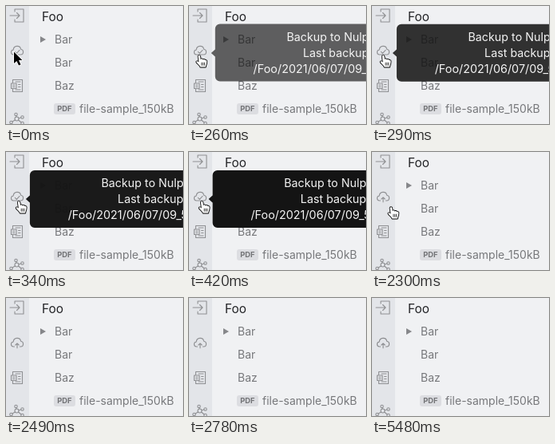
An HTML page with a canvas that plays this animation: 222x148 px, repeating every 8 s.

```html
<!DOCTYPE html>
<html lang="en">
<head>
<meta charset="utf-8">
<title>Backup tooltip</title>
<style>
html, body { margin: 0; width: 100%; height: 100%; overflow: hidden; background: #f0f1f3; }
canvas { display: block; width: 222px; height: 148px; }
</style>
</head>
<body>
<canvas id="stage"></canvas>
<script>
const W = 222, H = 148, LOOP = 8000;
const canvas = document.getElementById('stage');
const ctx = canvas.getContext('2d');
const ratio = window.devicePixelRatio || 1;
canvas.width = W * ratio;
canvas.height = H * ratio;

const FONT = 'Inter, "Liberation Sans", sans-serif';
const ICON = '#8f9093';

function text(str, x, y, size, color, weight = 400, align = 'left') {
  ctx.font = `${weight} ${size}px ${FONT}`;
  ctx.fillStyle = color;
  ctx.textAlign = align;
  ctx.fillText(str, x, y);
}

function box(x, y, w, h, r, color) {
  ctx.beginPath();
  ctx.roundRect(x, y, w, h, r);
  ctx.fillStyle = color;
  ctx.fill();
}

function line(d, color = ICON, width = 1.1) {
  ctx.strokeStyle = color;
  ctx.lineWidth = width;
  ctx.stroke(new Path2D(d));
}

function dot(x, y, r) {
  ctx.beginPath();
  ctx.arc(x, y, r, 0, Math.PI * 2);
  ctx.strokeStyle = ICON;
  ctx.lineWidth = 1.1;
  ctx.stroke();
}

function cloud(mark, color) {
  const outline = 'M10.5 61 H9.3 C5.5 60.6 5.5 55.4 9.2 55 C9.4 49.2 17.8 48.8 18.6 54.2 C22.6 54.6 22.6 60.7 18.6 61 ';
  if (mark === 'check') line(outline + 'Z M11.3 57.4 L13.3 59.4 L17 55.4', color);
  else line(outline + 'H17.3 M14 62.7 V56.8 M11.8 59 L14 56.8 L16.2 59', color);
}

function sidebar(t) {
  ctx.fillStyle = '#e3e5e9';
  ctx.fillRect(0, 0, 29, H);
  line('M11 7 V4 H22 V20 H11 V17 M5 12 H17 M13.5 8.5 L17 12 L13.5 15.5');
  cloud(t < 740 ? 'check' : 'up', t < 5480 ? ICON : '#898a8d');
  line('M8.5 96.5 V92.5 H20.5 V107.5 H8.5 V104 M6.5 97 H13 V103.5 H6.5 Z');
  line('M8.5 99.2 H11 M8.5 101.4 H11 M12 95 H18 M15.5 98.5 H18 M15.5 101.5 H18 M12 105 H18', ICON, 1);
  dot(13.5, 141.5, 2.5);
  dot(12.5, 136, 1.7);
  dot(20.5, 139.5, 1.7);
  dot(6.5, 146, 1.7);
  dot(20.5, 147, 1.7);
  line('M13 137.6 V139 M16 140.8 L18.8 140 M11.3 143 L8.1 145 M15.5 143 L19 146');
}

function list() {
  text('Foo', 45, 19, 15.4, '#222326');
  ctx.fillStyle = '#86878a';
  ctx.fill(new Path2D('M43 38 L50 42 L43 46 Z'));
  text('Bar', 61, 47, 14, '#77787b');
  text('Bar', 61, 76, 14, '#77787b');
  text('Baz', 61, 105, 14, '#77787b');
  box(60, 122, 27, 14, 3, '#dcdde1');
  text('PDF', 73.3, 132.3, 9.4, '#737477', 700, 'center');
  text('file-sample_150kB', 92, 134, 14, '#77787b');
}

function tooltip(t) {
  if (t < 230 || t >= 740) return;
  const a = t >= 420 ? 1 : 1 - Math.exp(-(t - 226) * 0.031);
  const x = 29.6 + 9.5 * (1 - a);
  ctx.save();
  ctx.globalAlpha = a;
  ctx.fillStyle = '#141414';
  ctx.beginPath();
  ctx.roundRect(x, 23 - 1.5 * (1 - a), 260, 72, 6);
  ctx.moveTo(x + 1, 53.5);
  ctx.lineTo(x + 1, 64.5);
  ctx.lineTo(x - 5, 59);
  ctx.closePath();
  ctx.fill('nonzero');
  ctx.globalAlpha = Math.min(1, a * 1.6);
  text('Backup to Nulpbin', x + 89.6, 44, 14.3, '#f4f4f4');
  text('Last backup:', x + 110.2, 64, 14.3, '#f4f4f4');
  text('/Foo/2021/06/07/09_50', x + 47.8, 84, 14.4, '#f4f4f4');
  ctx.restore();
}

function shape(d, x, y, fill, edge, width) {
  ctx.save();
  ctx.translate(x, y);
  const path = new Path2D(d);
  ctx.lineJoin = 'round';
  ctx.strokeStyle = edge;
  ctx.lineWidth = width;
  ctx.stroke(path);
  ctx.fillStyle = fill;
  ctx.fill(path);
  ctx.restore();
}

function arrow(x, y) {
  shape('M0 0 V14.5 L3.4 11.4 L6 17 L8.5 15.9 L6 10.4 H10.4 Z', x, y, '#000', '#fff', 1.8);
}

function hand(x, y) {
  ctx.save();
  ctx.translate(x, y);
  ctx.scale(0.93, 0.95);
  shape('M-1.5 1 C-1.5 -.6 1.2 -.6 1.4 1 L2 5 C2.6 3.8 4.6 4 4.8 5.4 ' +
    'C5.5 4.4 7.4 4.7 7.6 6 C8.6 5.3 10.3 6 10.2 7.6 C10.2 11 9 12 8.6 15 ' +
    'H1.5 C1 12.6 -2.5 11 -3.8 8.6 C-4.2 7 -2.2 6.8 -.4 8.6 Z', 0, 0, '#fff', '#000', 1.8);
  line('M3.2 9.3 V12.6 M5.2 9.3 V12.6 M7.2 9.3 V12.6', '#000', 0.8);
  ctx.restore();
}

const mix = (a, b, p) => a + (b - a) * p;

function cursor(t) {
  if (t < 230) arrow(10, 57.5);
  else if (t < 740) hand(mix(12.8, 16.2, Math.min(1, Math.max(0, (t - 260) / 80))), 62.3);
  else if (t < 2300) hand(17.5, 62);
  else if (t < 2490) {
    const p = (t - 2300) / 190;
    const x = mix(23.8, 228, p ** 1.4), y = mix(69.2, 94, p);
    if (x < 29) hand(x, y);
    else arrow(x, y);
  } else if (t >= 2700 && t < 2780) {
    const p = (t - 2700) / 80;
    arrow(mix(198, 40, p), mix(92, 148, p));
  }
}

function draw(t) {
  ctx.setTransform(ratio, 0, 0, ratio, 0, 0);
  ctx.lineCap = ctx.lineJoin = 'round';
  ctx.fillStyle = '#f0f1f3';
  ctx.fillRect(0, 0, W, H);
  sidebar(t);
  list();
  tooltip(t);
  cursor(t);
}

const start = performance.now();
function tick() {
  draw((performance.now() - start) % LOOP);
  requestAnimationFrame(tick);
}
tick();
</script>
</body>
</html>
```
